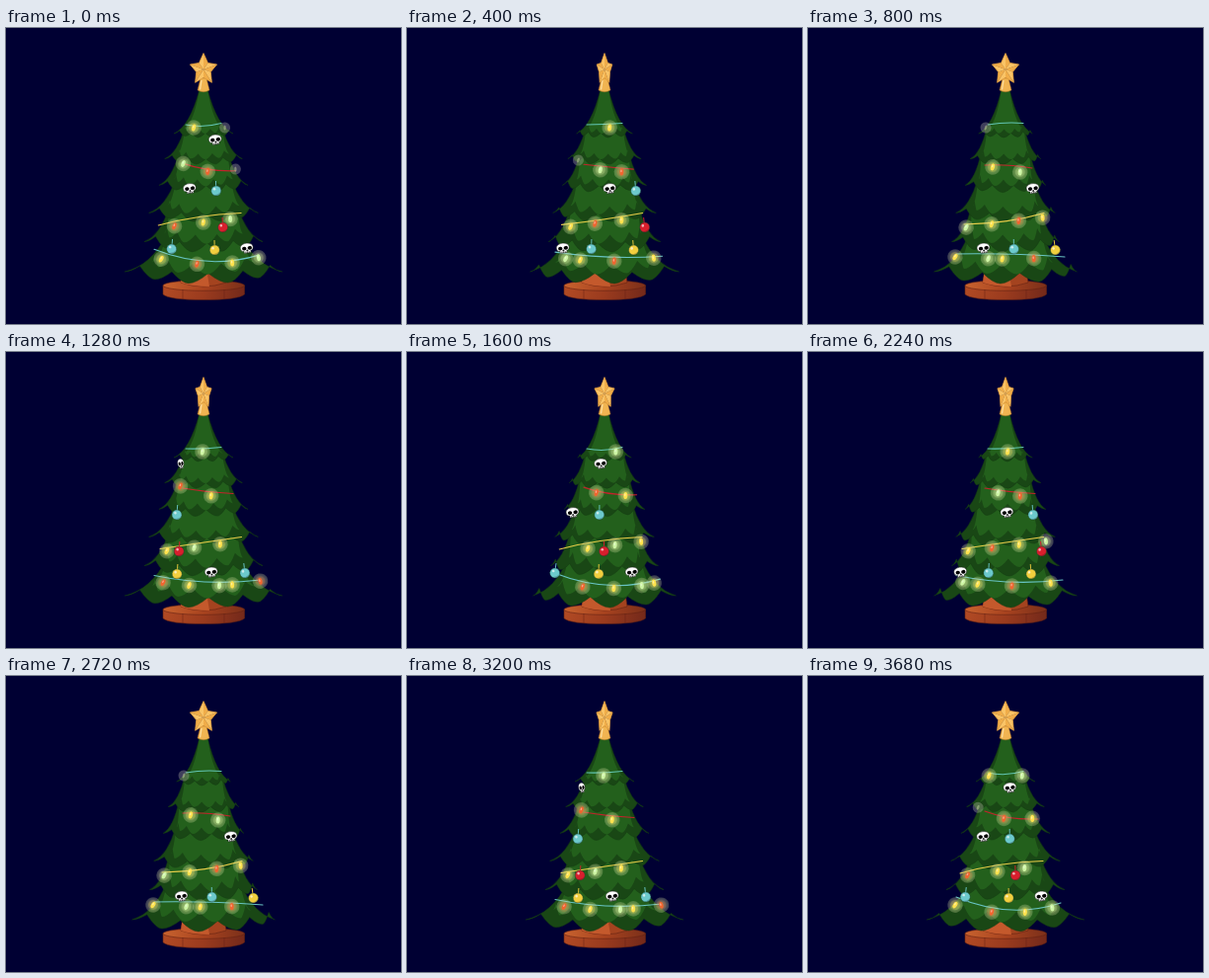
An HTML page that plays this animation: 400x300 px, repeating every 3.76 s.

```html
<!DOCTYPE html>
<html lang="en">
<head>
<meta charset="utf-8">
<title>Turning tree</title>
<style>
  html, body { margin: 0; width: 100%; height: 100%; overflow: hidden; background: #000033; }
  svg { display: block; width: 400px; height: 300px; }
</style>
</head>
<body>
<svg viewBox="0 0 400 300">
  <defs>
    <linearGradient id="rim"><stop offset="0" stop-color="#b14a24"/><stop offset=".5" stop-color="#9a3b1e"/><stop offset="1" stop-color="#74291a"/></linearGradient>
    <linearGradient id="plate"><stop offset="0" stop-color="#c8632f"/><stop offset=".5" stop-color="#a8431f"/><stop offset="1" stop-color="#7c301a"/></linearGradient>
    <radialGradient id="halo"><stop offset="0" stop-color="#f4f3a0" stop-opacity=".6"/><stop offset=".6" stop-color="#e4eaa0" stop-opacity=".38"/><stop offset="1" stop-color="#d5e2a5" stop-opacity=".24"/></radialGradient>
  </defs>
  <rect width="400" height="300" fill="#000033"/>
  <g stroke="#642214" stroke-width=".6">
    <path d="M159 261V270Q165 275.500 200 275.500T241.500 270V261Z" fill="url(#rim)"/>
    <ellipse cx="200.200" cy="261" rx="41.300" ry="5.300" fill="url(#plate)"/>
    <path d="M179 244H221L223 258Q200 266 177 258Z" fill="#a4431f"/>
    <path d="M179 244H203L206 262Q188 262 177 258Z" fill="#c4592c" stroke="none"/>
    <path d="M179 265V275M221 265V275" fill="none" stroke-width=".5"/>
  </g>
  <g id="tree" stroke="#153d13" stroke-width=".5" stroke-linejoin="round"></g>
  <g id="strings" fill="none" stroke-width="1.100" stroke-linecap="round"></g>
  <g id="items"></g>
  <path d="M197 51H203L206 63Q200 66.500 194 63Z" fill="#f1b451" stroke="#b97627" stroke-width=".5"/>
  <path d="M198 53L196.500 62.500" stroke="#ffe0a0" stroke-width="1.300"/>
  <g id="star"></g>
</svg>
<script>
const STEP = 80, FRAMES = 47, TURN = 24, CX = 200;
const $ = id => document.getElementById(id);
const { sin, cos, abs, PI } = Math;
const rad = deg => deg * PI / 180;
const r1 = v => Math.round(v * 10) / 10;
const pt = (x, y) => r1(CX + x) + ' ' + r1(y);

// Tree: six tiers, each a ring of ten leaves
const widths = [32, 42, 48, 59, 64, 85], GAP = 36;
const tipY = i => 107 + 25 * i + .6 * i * i;

function tierPath(i, k, light) {
  const top = i ? tipY(i - 1) - 7 : 62, w0 = i ? widths[i - 1] * .58 : 4;
  const spread = 1 - .16 * abs(sin(PI * (k + 1) / 8));
  const lobe = 5 + 1.3 * i, drop = 4 + 1.6 * i;
  const side = widths[i] * spread * (light ? .66 : 1);
  const sideY = tipY(i) - (light ? lobe * .8 : 0);
  const reach = widths[i] * (light ? .58 : .76);
  const bend = w0 + (side - w0) * .38, bendY = sideY - (sideY - top) * .16;
  const shift = (k + 1) % 8 / 8 * GAP + (light ? 0 : GAP / 2);

  const leaves = [];
  for (let a = shift + 2 * GAP; a > -74; a -= GAP)
    if (a < 74) leaves.push([reach * sin(rad(a)), sideY + drop * cos(rad(a))]);
  leaves.push([-side, sideY]);

  let d = `M${pt(-w0, top)}L${pt(w0, top)}Q${pt(bend, bendY)} ${pt(side, sideY)}`;
  let px = side, py = sideY;
  for (const [x, y] of leaves) {
    const vx = (px + x) / 2, vy = (py + y) / 2 - lobe * .85;
    d += `Q${pt(px * .6 + vx * .4, py)} ${pt(vx, vy)}Q${pt(x * .6 + vx * .4, y)} ${pt(x, y)}`;
    [px, py] = [x, y];
  }
  return d + `Q${pt(-bend, bendY)} ${pt(-w0, top)}Z`;
}

function drawTree(k) {
  let out = '';
  for (let i = widths.length - 1; i >= 0; i--)
    out += `<path d="${tierPath(i, k, false)}" fill="#194715"/>` +
      `<path d="${tierPath(i, k, true)}" fill="#23601c" stroke="none"/>`;
  return out;
}

// Everything drifts to the right, a little slower early in the turn
const drift = k => k - .84 * sin(PI * (k - 3) / 12);
const sagAt = k => .5 + .5 * cos(PI * (k - 22) / 12);

const GREEN = '#cdf5a4', YELLOW = '#ffe24d', RED = '#f0652f';

// Lights: [colour, moment at the middle, speed]
const rows = [
  { mid: 200, reach: 21.8, dim: 2, color: '#62c6b4', y: () => 101,
    wire: s => `M182 98Q200 ${95 + 7 * s} 218 96.500`,
    lights: [[GREEN, 16.6, 2.7], [YELLOW, 27.2, 3.8]] },
  { mid: 202.3, reach: 30.2, dim: 2, color: '#c3222b', y: u => 146 - 7 * (u - .35) ** 2,
    wire: s => `M179 ${139 - 2 * s}Q202 ${138 + 8 * s} ${227 + 6 * s} ${142 + 3 * s}`,
    lights: [[GREEN, 29.6, 4.1], [RED, 23.3, 3.3], [YELLOW, 13.6, 2.95]] },
  { mid: 200, reach: 43, dim: 0, color: '#ebcf49', y: u => 197 - 5.5 * u,
    wire: s => `M${158 - 4 * s} ${199 + s}Q${204 - 12 * s} ${198 - 9 * s} ${239 - s} 187.500`,
    lights: [[RED, 30.5, 5], [YELLOW, 24.65, 4.4], [GREEN, 18.37, 4.35], [YELLOW, 12.37, 4.4]] },
  { mid: 203.5, reach: 55, dim: 0, color: '#68c4c4', y: (u, s) => 232 + (2 + 6 * s) * (1 - u * u),
    wire: s => `M150 ${229 - 5 * s}Q204 ${228 + 19 * s} ${260 - 4 * s} ${232 - 2 * s}`,
    lights: [[YELLOW, 19, 5.2], [YELLOW, 33.9, 4.6], [RED, 26.2, 4.1], [GREEN, 12.85, 4.75]] }
];

// Ornaments: [draw, y, reach, moment at the middle, speed]
const ornaments = [
  [ball('#6cc9cc'), 165, 40, 21.9, 4.75],
  [ball('#d81f2d'), 202, 45, 20.9, 5.3],
  [ball('#f2cf3e'), 225, 53, 22.1, 4.55],
  [ball('#6cc9cc'), 224, 53, 31.4, 4.75],
  [skull, 113, 25, 21.75, 4.15],
  [skull, 162.5, 42, 27.5, 4.85],
  [skull, 223, 52, 14.4, 4.3]
];

// Visible places of one item; it may leave on the right while entering on the left
function places(k, when, speed, mid, reach) {
  return [k, k + TURN].map(t => CX + speed * (drift(t) - when))
    .filter(x => abs(x - mid) <= reach);
}

const place = (x, y, body, sx = 1, turn = 0) =>
  `<g transform="translate(${r1(x)} ${r1(y)}) rotate(${r1(turn)}) scale(${sx} 1)">${body}</g>`;

function light(color, x, y, dim) {
  const body = dim
    ? '<circle r="5.5" fill="#b8b8a8" opacity=".35"/><ellipse rx="1.2" ry="2.6" fill="#c4d0a0" opacity=".5"/>'
    : `<circle r="7.8" fill="url(#halo)"/><circle r="5" fill="${color}" opacity=".2"/>` +
      `<ellipse rx="2" ry="3.6" fill="${color}"/><ellipse cx="-.5" cy="-.8" rx=".7" ry="1.4" fill="#fff" opacity=".45"/>`;
  return place(x, y, body, 1, 10 + (CX - x) * .4);
}

function ball(color) {
  return (x, y, sx) => place(x, y,
    `<path d="M0-5V-10" stroke="${color}" stroke-width=".9"/>` +
    `<circle r="5" fill="${color}" stroke="#163c30" stroke-width=".4"/>` +
    '<path d="M4.400 1A4.600 4.600 0 0 1-2 4.200Q2.500 4 4.400 1Z" opacity=".22"/>' +
    '<circle cx="-1.700" cy="-1.800" r="1.300" fill="#fff" opacity=".65"/>', sx, (x - CX) * -.15);
}

function skull(x, y, sx) {
  return place(x, y,
    '<path d="M-6.500-.5C-6.500-6.300 6.500-6.300 6.500-.5C6.500 2 5 2.800 3.600 3V5H-3.200V3C-5 2.800-6.500 2-6.500-.5Z" fill="#fff" stroke="#101810" stroke-width=".5"/>' +
    '<ellipse cx="-2.600" cy=".2" rx="2.200" ry="1.900"/><ellipse cx="3" cy=".2" rx="2.200" ry="1.900"/>' +
    '<path d="M.2 1.700L-.5 3H1ZM-1.500 3.500V5M.2 3.600V5M1.900 3.500V5" stroke="#000" stroke-width=".6"/>',
    sx, -8);
}

function drawItems(k) {
  let out = '';
  for (const { mid, reach, dim, y, lights } of rows)
    for (const [color, when, speed] of lights)
      for (const x of places(k, when, speed, mid, reach)) {
        const u = (x - mid) / reach;
        out += light(color, x, y(u, sagAt(k)), abs(x - mid) > reach - dim);
      }
  for (const [draw, y, reach, when, speed] of ornaments)
    for (const x of places(k, when, speed, CX, reach))
      out += draw(x, y, abs(x - CX) > reach - 2.5 ? .5 : 1);
  return out;
}

function drawStar(k) {
  const sx = 1 - .5 * abs(sin(PI * (k + 1) / 12));
  const corner = i => {
    const inner = i % 2, r = inner ? 8.2 : 16.4, a = rad(36 * i - 90);
    return pt(r * cos(a) * (inner ? Math.sqrt(sx) : sx), 42 + r * sin(a));
  };
  let facets = '', rim = '';
  for (let i = 0; i < 10; i++) {
    rim += corner(i) + ' ';
    facets += `<polygon points="200 42 ${corner(i)} ${corner(i + 1)}" fill="${i % 2 ? '#ffd27c' : '#eaa542'}"/>`;
  }
  return facets + `<polygon points="${rim}" fill="#f5b650" fill-opacity=".5" stroke="#dc9a3e" stroke-width=".8" stroke-linejoin="round"/>`;
}

let shown = -1;
function render(ms) {
  const frame = Math.floor(ms / STEP) % FRAMES;
  if (frame === shown) return;
  shown = frame;
  const k = frame % TURN;
  $('tree').innerHTML = drawTree(k);
  $('strings').innerHTML = rows.map(r => `<path d="${r.wire(sagAt(k))}" stroke="${r.color}"/>`).join('');
  $('items').innerHTML = drawItems(k);
  $('star').innerHTML = drawStar(k);
}

const start = performance.now();
function tick() {
  render(performance.now() - start);
  requestAnimationFrame(tick);
}
tick();
</script>
</body>
</html>
```
